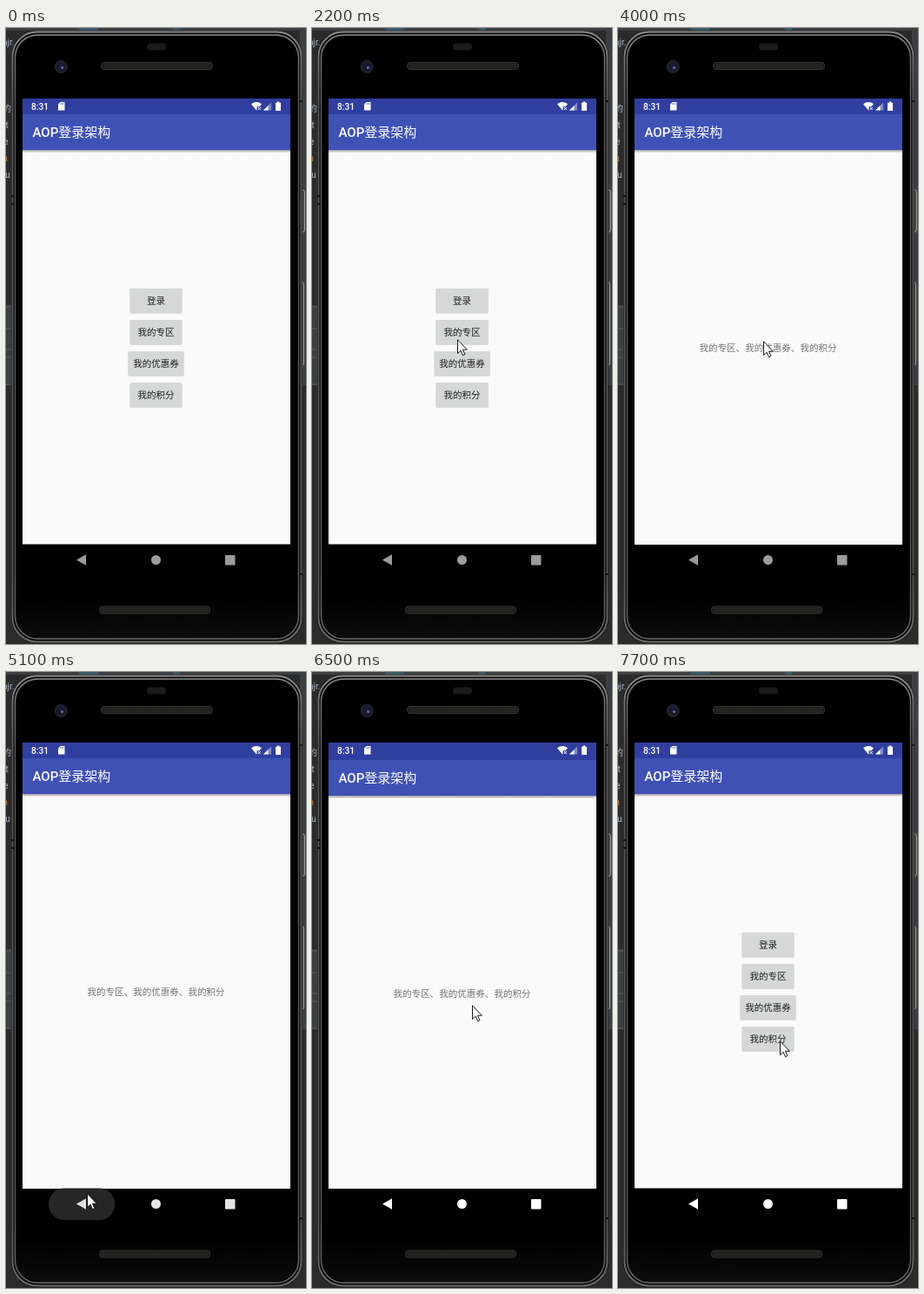
An HTML page that plays this animation: 345x707 px, repeating every 8000 ms.

```html
<!DOCTYPE html>
<html lang="zh">
<head>
<meta charset="utf-8">
<title>登录演示</title>
<style>
html, body { margin: 0; width: 100%; height: 100%; overflow: hidden; background: #2b2b2b; }
svg { display: block; width: 100vw; height: 100vh; }
text { font-family: Roboto, "Noto Sans CJK SC", "Noto Sans CJK", "Noto Sans SC", sans-serif; }
.title { font-size: 15px; font-weight: 500; fill: #fff; }
.title tspan { font-weight: 400; }
.clock { font-size: 10.2px; font-weight: 500; fill: #fff; }
.label { font-size: 10.55px; text-anchor: middle; fill: #1f1f1f; }
.note { fill: #757575; }
.code { font: 10px "Liberation Mono", "Noto Sans CJK SC", monospace; fill: #a9b7c6; }

.anim { animation: 8s step-end -5ms infinite; }
#cursor { animation-name: cursor; }
#page { animation-name: page; }
#nav { animation-name: nav; }
#ripple { animation-name: ripple; }
#login { animation-name: login; }
#zone { animation-name: zone; }
#coupon { animation-name: coupon; }

@keyframes cursor {
  0% { transform: translate(400px, 60px); }
  2.5% { transform: translate(318px, 92px); animation-timing-function: steps(3); }
  6.25% { transform: translate(236px, 205px); animation-timing-function: steps(4); }
  11.25%, 16.25% { transform: translate(182px, 307px); }
  16.25% { animation-timing-function: steps(5); }
  22.5%, 25% { transform: translate(164px, 361px); }
  25% { animation-timing-function: steps(2); }
  27.5% { transform: translate(167px, 357px); }
  45%, 48.75% { transform: translate(167px, 359px); }
  48.75% { animation-timing-function: steps(5); }
  55% { transform: translate(84px, 564px); animation-timing-function: steps(3); }
  58.75%, 61.25% { transform: translate(89px, 601px); }
  61.25% { animation-timing-function: steps(2); }
  63.75%, 65% { transform: translate(93px, 598px); }
  65% { animation-timing-function: steps(3); }
  68.75%, 70% { transform: translate(204px, 370px); }
  70% { animation-timing-function: steps(2); }
  72.5%, 80% { transform: translate(184px, 382px); }
  80% { animation-timing-function: steps(5); }
  86.25%, 91.25% { transform: translate(87px, 610px); }
  91.25% { animation-timing-function: steps(4); }
  96.25%, 100% { transform: translate(186px, 423px); }
}
@keyframes page {
  0% { opacity: 0; transform: translateY(41px); }
  46.25%, 78.75% { opacity: .35; transform: translateY(24px); }
  47.5%, 80% { opacity: .8; transform: translateY(9px); }
  48.75%, 81.25% { opacity: 1; transform: translateY(2px); }
  50%, 82.5% { opacity: 1; transform: none; }
  65%, 90% { opacity: .85; transform: translateY(8px); }
  66.25%, 91.25% { opacity: .3; transform: translateY(28px); }
  67.5%, 92.5%, 100% { opacity: 0; transform: translateY(41px); }
}
@keyframes nav {
  0% { fill: #9c9c9c; }
  62.5% { fill: #c4c4c4; }
  63.75% { fill: #e2e2e2; }
  65%, 100% { fill: #fff; }
}
@keyframes ripple {
  0%, 66.25%, 91.25%, 100% { opacity: 0; }
  62.5%, 65% { opacity: .5; }
  63.75%, 88.75% { opacity: 1; }
  90% { opacity: .5; }
}
@keyframes login {
  0%, 20%, 100% { fill: #d6d7d7; }
  15% { fill: #c5c6c6; }
  17.5% { fill: #cecfcf; }
}
@keyframes zone {
  0%, 48.75%, 100% { fill: #d6d7d7; }
  38.75% { fill: #cdcece; }
  40% { fill: #c5c6c6; }
  42.5% { fill: #cdcdcd; }
  45% { fill: #d5d4d4; }
}
@keyframes coupon {
  0%, 82.5%, 100% { fill: #d6d7d7; }
  76.25% { fill: #cacbcb; }
  77.5% { fill: #c5c6c6; }
  80% { fill: #cfcfcf; }
}
</style>
</head>
<body>
<svg viewBox="0 0 345 707" preserveAspectRatio="none">
  <defs>
    <linearGradient id="rim" x2="0" y2="1">
      <stop offset="0" stop-color="#8c8c8c"/>
      <stop offset=".04" stop-color="#757575"/>
      <stop offset=".12" stop-color="#585858"/>
      <stop offset=".9" stop-color="#585858"/>
      <stop offset="1" stop-color="#6e6e6e"/>
    </linearGradient>
    <linearGradient id="glass" x2="0" y2="1">
      <stop offset=".93" stop-color="#000"/>
      <stop offset="1" stop-color="#0c0c0c"/>
    </linearGradient>
    <linearGradient id="fade" x2="0" y2="1">
      <stop offset="0" stop-opacity=".36"/>
      <stop offset="1" stop-opacity="0"/>
    </linearGradient>
    <pattern id="mesh" width="3" height="3" patternUnits="userSpaceOnUse">
      <path d="M0 0L3 3M3 0L0 3" stroke="#33332e" stroke-width=".6"/>
    </pattern>
    <filter id="lift" x="-10%" y="-20%" width="120%" height="150%">
      <feDropShadow dx="0" dy=".8" stdDeviation=".6" flood-opacity=".3"/>
    </filter>
    <clipPath id="screen"><rect x="19" y="81" width="308" height="511.5"/></clipPath>
    <g id="frame">
      <rect x="19" y="81" width="308" height="512" fill="#fafafa"/>
      <rect x="19" y="140" width="308" height="3.5" fill="url(#fade)"/>
      <rect x="19" y="98" width="308" height="42" fill="#3f51b5"/>
      <rect x="19" y="81" width="308" height="18" fill="#303f9f"/>
      <text class="title" x="30.5" y="125">AOP<tspan>登录架构</tspan></text>
    </g>
  </defs>

  <!-- desktop behind the phone -->
  <rect width="345" height="707" fill="#2b2b2b"/>
  <rect width="345" height="3" fill="#3c3f41"/>
  <rect x="338" width="7" height="410" fill="#3c3f41"/>
  <path d="M84 1.500h22M192 1.500h8" stroke="#35677c" stroke-width="2"/>
  <g class="code">
    <text x="-4" y="20">njr.</text>
    <text x="-4" y="96">的</text>
    <text x="-6" y="115">at</text>
    <text x="-6" y="134">te</text>
    <text x="-6" y="153" fill="#cc7832">la</text>
    <text x="-6" y="172">Lu</text>
  </g>
  <rect y="318" width="8" height="92" fill="#3c3f41"/>
  <path d="M0 320h8M0 345h8M0 369h8M0 378h8M0 409h8" stroke="#5b5e60"/>

  <!-- phone body -->
  <g fill="#4a4a4a" stroke="#a0a0a0">
    <rect x="336.500" y="186" width="7" height="48" rx="2"/>
    <rect x="336.500" y="292" width="6" height="95" rx="2"/>
  </g>
  <rect x="6" y="3" width="335" height="703" rx="29" fill="#080808"/>
  <g fill="none" stroke="url(#rim)">
    <rect x="7.500" y="4.500" width="332" height="700" rx="28" stroke-width="2"/>
    <rect x="10.500" y="8" width="326" height="693" rx="26" stroke-width="1.400"/>
  </g>
  <rect x="12" y="10" width="323" height="689" rx="25" fill="url(#glass)"/>
  <path d="M6 193h4M6 202h4M337 84h4M337 627h4" stroke="#111" stroke-width="2"/>
  <rect x="162" y="17.500" width="22" height="8" rx="4" fill="#1c1a1b"/>
  <circle cx="63.300" cy="44.500" r="7" fill="#1b1d29" stroke="#282a32"/>
  <circle cx="63.300" cy="44.500" r="4" fill="#141a38"/>
  <circle cx="64.500" cy="45.500" r="1.500" fill="#6a72a8"/>
  <g stroke="#363636" fill="#1b1b19">
    <rect x="109.500" y="39.500" width="128" height="8" rx="3.500"/>
    <rect x="107.500" y="664" width="127" height="8" rx="3.500"/>
  </g>
  <rect x="112" y="41" width="123" height="5" fill="url(#mesh)"/>
  <rect x="110" y="665.500" width="122" height="5" fill="url(#mesh)"/>

  <!-- app -->
  <g clip-path="url(#screen)">
    <use href="#frame"/>
    <g filter="url(#lift)" fill="#d6d7d7">
      <rect id="login" class="anim" x="142.500" y="299" width="60" height="27.500" rx="1.200"/>
      <rect id="zone" class="anim" x="142.500" y="335" width="60" height="27.500" rx="1.200"/>
      <rect id="coupon" class="anim" x="140.500" y="371" width="64" height="27.500" rx="1.200"/>
      <rect x="142.500" y="407" width="60" height="27.500" rx="1.200"/>
    </g>
    <g class="label">
      <text x="172.500" y="316.700">登录</text>
      <text x="172.500" y="352.700">我的专区</text>
      <text x="172.500" y="388.700">我的优惠券</text>
      <text x="172.500" y="424.700">我的积分</text>
    </g>
    <g id="page" class="anim">
      <use href="#frame"/>
      <text class="label note" x="172.500" y="370.700">我的专区、我的优惠券、我的积分</text>
    </g>
  </g>

  <!-- status bar -->
  <text class="clock" x="29" y="93.800">8:31</text>
  <g fill="#fff">
    <path d="M62.500 85H67.500V94.500H60V87.500z"/>
    <path d="M282 87.200Q288 82.800 294 87.200L291.500 90.300H288.500V93.800L288 94.500z"/>
    <path d="M305 85.500V94.500H296z" opacity=".4"/>
    <path d="M301.500 89V94.500H296z"/>
    <path d="M310 85.800h1.700v-1.300h2.600v1.300H316V95H310z"/>
  </g>
  <path d="M62.800 86v2M64.400 86v2M66 86v2" stroke="#303f9f" stroke-width=".6"/>
  <path d="M289.800 91l3 3M292.800 91l-3 3" stroke="#fff"/>

  <!-- navigation bar -->
  <rect id="ripple" class="anim" x="49" y="592.500" width="76" height="36.500" rx="18" fill="#262626"/>
  <g id="nav" class="anim">
    <path d="M81 610.500L92 604.300V616.700z"/>
    <circle cx="172.500" cy="610.500" r="5.500"/>
    <rect x="252" y="605" width="11.500" height="11.500" rx="1"/>
  </g>

  <g id="cursor" class="anim">
    <path d="M.5 .8V16.500L4.100 13.200L6.500 18.700L8.900 17.600L6.500 12.200H11.400z" fill="#fff" stroke="#000" stroke-width=".9"/>
  </g>
</svg>
</body>
</html>
```
